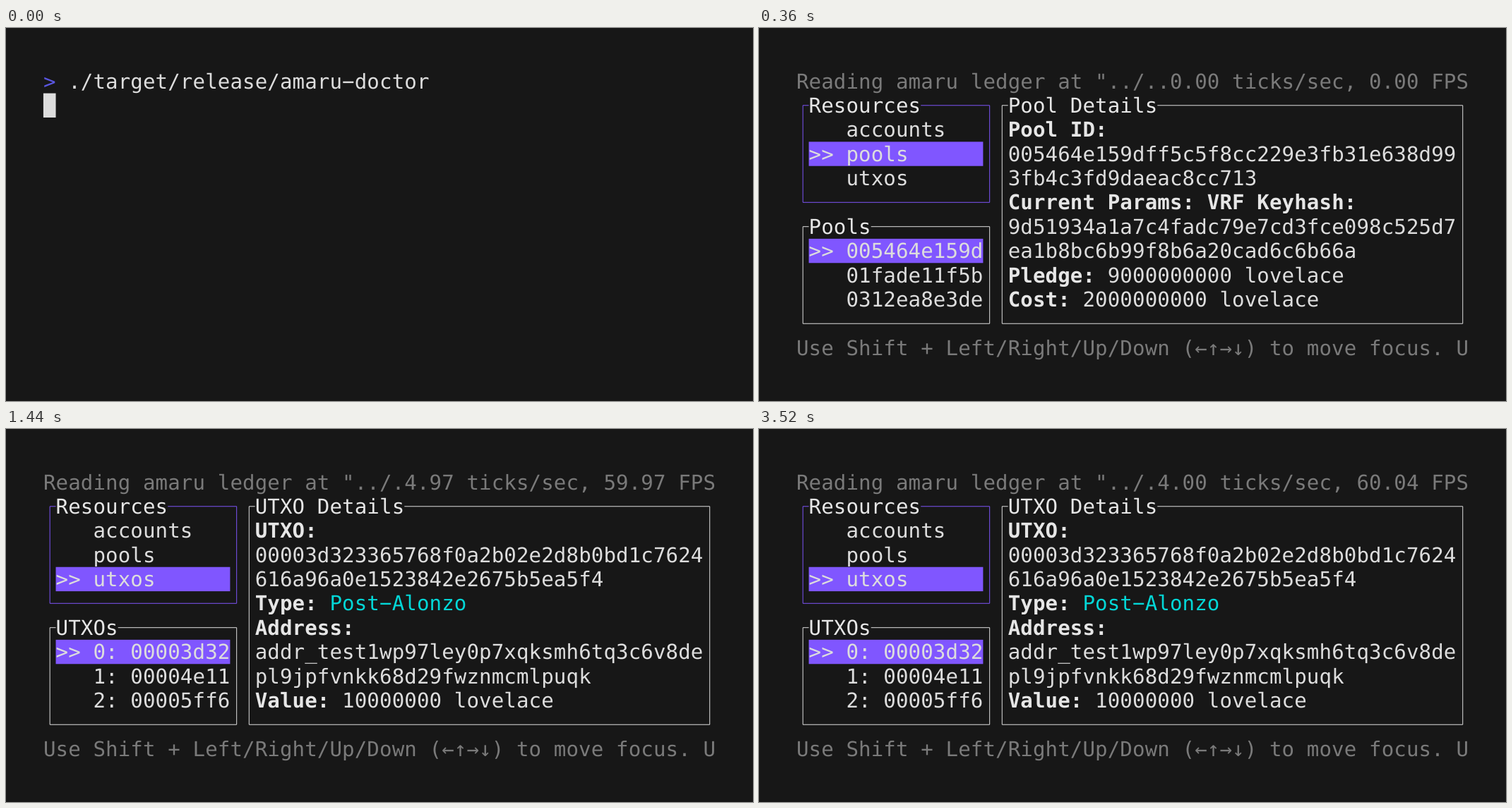
An HTML page that plays this animation: 1058 by 529 pixels, repeating every 4240 ms.

```html
<!DOCTYPE html>
<html lang="en">
<head>
<meta charset="utf-8">
<title>Terminal ledger browser</title>
<style>
  html, body { margin: 0; width: 100%; height: 100%; overflow: hidden; background: #171717; }
  svg { display: block; width: 1058px; height: 529px; }
  text {
    font: 33px "DejaVu Sans Mono", "Noto Sans Mono", monospace;
    letter-spacing: .132px;
    white-space: pre;
    text-rendering: geometricPrecision;
    fill: #ddd;
  }
  .bold { font-weight: bold; fill: #e6e6e6; }
  .title { fill: #e6e6e6; }
  .dim { fill: #7a7a7a; }
  .cyan { fill: #04d7d7; }
  .prompt { fill: #5a56e0; }
</style>
</head>
<body>
<svg id="screen" viewBox="0 0 1200 600"></svg>
<script>
const LOOP = 4240;
const CELL_W = 20, CELL_H = 39, LEFT = 60, TOP = 66, ASCENT = 31;
const BLUE = '#8056ff';
const screen = document.getElementById('screen');

const colX = col => LEFT + col * CELL_W;
const rowY = row => TOP + row * CELL_H;
const span = (cls, s) => `<tspan class="${cls}">${s}</tspan>`;
const bold = s => span('bold', s);

// The terminal face has a wide hyphen, which the minus sign resembles.
const wide = s => s.replace(/([a-z])-(?=[a-zA-Z])/g, '$1\u2212');

const text = (col, row, s, cls = '') =>
  `<text class="${cls}" x="${colX(col)}" y="${rowY(row) + ASCENT}">${s}</text>`;

const block = (col, row, cols, fill) =>
  `<rect x="${colX(col)}" y="${rowY(row)}" width="${cols * CELL_W}" height="${CELL_H}" fill="${fill}"/>`;

function panel(col, row, lastCol, lastRow, title, stroke) {
  const x0 = colX(col) + 10.5, x1 = colX(lastCol) + 10.5;
  const y0 = rowY(row) + 19.5, y1 = rowY(lastRow) + 19.5;
  const gap = colX(col + 1), resume = colX(col + 1 + title.length);
  return `<path d="M${gap} ${y0}H${x0}V${y1}H${x1}V${y0}H${resume}" fill="none" stroke="${stroke}" stroke-width="1.1"/>`
    + text(col + 1, row, title, 'title');
}

function list(row, title, items, selected, stroke) {
  const rows = items.map((item, i) => {
    const on = i === selected;
    return (on ? block(1, row + 1 + i, 14, BLUE) + text(1, row + 1 + i, '&gt;&gt;') : '')
      + text(4, row + 1 + i, item);
  });
  return panel(0, row, 15, row + 4, title, stroke) + rows.join('');
}

const utxoDetails = {
  title: 'UTXO Details',
  lines: [
    bold('UTXO:'),
    '00003d323365768f0a2b02e2d8b0bd1c7624',
    '616a96a0e1523842e2675b5ea5f4',
    bold('Type:') + ' ' + span('cyan', wide('Post-Alonzo')),
    bold('Address:'),
    'addr_test1wp97ley0p7xqksmh6tq3c6v8de',
    'pl9jpfvnkk68d29fwznmcmlpuqk',
    bold('Value:') + ' 10000000 lovelace',
  ],
};

const poolDetails = {
  title: 'Pool Details',
  lines: [
    bold('Pool ID:'),
    '005464e159dff5c5f8cc229e3fb31e638d99',
    '3fb4c3fd9daeac8cc713',
    bold('Current Params: VRF Keyhash:'),
    '9d51934a1a7c4fadc79e7cd3fce098c525d7',
    'ea1b8bc6b99f8b6a20cad6c6b66a',
    bold('Pledge:') + ' 9000000000 lovelace',
    bold('Cost:') + ' 2000000000 lovelace',
  ],
};

const resources = ['accounts', 'pools', 'utxos'];
const views = [
  { title: 'Accounts', items: ['00019e643f2', '0004b9a0fd7', '00064eb9bf6'], details: utxoDetails },
  { title: 'Pools', items: ['005464e159d', '01fade11f5b', '0312ea8e3de'], details: poolDetails },
  { title: 'UTXOs', items: ['0: 00003d32', '1: 00004e11', '2: 00005ff6'], details: utxoDetails },
];

// Value of the last [start, value] step that has begun.
const stepAt = (steps, t) => steps.filter(([start]) => start <= t).pop()[1];
const focusSteps = [[0, 0], [360, 1], [760, 2]];
const tickSteps = [[0, '0.00'], [720, '4.97'], [1600, '4.00']];
const fpsSteps = [[0, '0.00'], [720, '60.65'], [1440, '59.97'], [2120, '59.99'], [3520, '60.04']];

function shell() {
  return text(0, 0, span('prompt', '&gt;') + wide(' ./target/release/amaru-doctor'))
    + block(0, 1, 1, '#ddd');
}

function app(t) {
  const focus = stepAt(focusSteps, t);
  const { title, items, details } = views[focus];
  const rate = `${stepAt(tickSteps, t)} ticks/sec, ${stepAt(fpsSteps, t)} FPS`;
  const status = 'Reading amaru ledger at "../../'.slice(0, 54 - rate.length) + rate;
  return text(0, 0, status, 'dim')
    + list(1, 'Resources', resources, focus, BLUE)
    + list(6, title, items, 0, '#e6e6e6')
    + panel(16, 1, 53, 10, details.title, '#e6e6e6')
    + details.lines.map((line, i) => text(17, 2 + i, line)).join('')
    + text(0, 11, 'Use Shift + Left/Right/Up/Down (←↑→↓) to move focus. U', 'dim');
}

function render(t) {
  if (t < 40) return shell();
  return t < 80 ? '' : app(t);
}

let shown = null;
function update(now) {
  const markup = render(now % LOOP);
  if (markup !== shown) screen.innerHTML = shown = markup;
}

const begin = performance.now();
function tick() {
  update(performance.now() - begin);
  requestAnimationFrame(tick);
}
tick();
</script>
</body>
</html>
```
